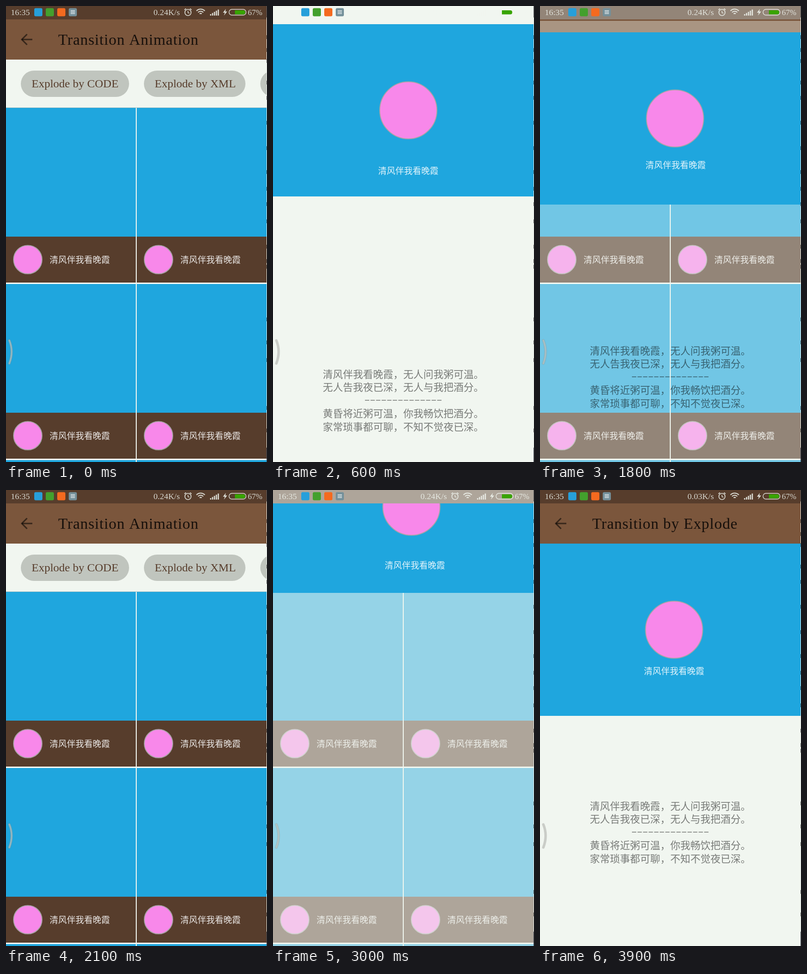
An HTML page with a canvas that plays this animation: 545x953 px, repeating every 4000 ms.

```html
<!DOCTYPE html>
<html lang="zh">
<head>
<meta charset="utf-8">
<title>Transition Animation</title>
<style>
html, body { margin: 0; width: 100%; height: 100%; overflow: hidden; background: #f1f6f0; }
canvas { display: block; }
</style>
</head>
<body>
<canvas id="stage" width="545" height="953"></canvas>
<script>
const ctx = document.getElementById('stage').getContext('2d');
const start = performance.now();
const W = 544, H = 953, LOOP = 4000, STEP = 100, BAR = 28;
const LIGHT = '#f1f6f0', BLUE = '#1fa6de', DARK = '#573d2c', BROWN = '#7b563c', PINK = '#f888ea';
const SERIF = '"Liberation Serif", "Times New Roman", serif';
const CJK = '"Noto Sans CJK SC", "Noto Sans CJK", sans-serif';
const NAME = '清风伴我看晚霞';
const NAME_INK = 'rgba(255,255,255,.88)';
const POEM = [
  NAME + '，无人问我粥可温。',
  '无人告我夜已深，无人与我把酒分。',
  '',
  '黄昏将近粥可温，你我畅饮把酒分。',
  '家常琐事都可聊，不知不觉夜已深。'
];

// Each part flies out by TRAVEL pixels; enter and leave are start times in ms.
const TRAVEL = 950;
const PARTS = {
  header: { enter: 157, leave: 1650, span: 615 },
  name: { enter: 190, leave: 1664, span: 506, leaveSpan: 620 },
  poem: { enter: 190, leave: 1644, span: 620 },
  toolbar: { enter: 240, leave: 1619, span: 620 }
};
const SECOND_ENTER = 2548;

const clamp = v => Math.min(1, Math.max(0, v));

function rect(x, y, w, h, color) {
  ctx.fillStyle = color;
  ctx.fillRect(x, y, w, h);
}

function round(x, y, w, h, r, color) {
  ctx.fillStyle = color;
  ctx.beginPath();
  ctx.roundRect(x, y, w, h, r);
  ctx.fill();
}

function text(str, x, y, size, color, family = SERIF, align = 'left', weight = 400) {
  ctx.font = `${weight} ${size}px ${family}`;
  ctx.textAlign = align;
  ctx.fillStyle = color;
  ctx.fillText(str, x, y);
}

function cjk(str, x, middle, size, color, align) {
  text(str, x, middle + size * 0.37, size, color, CJK, align, 300);
}

function line(points, width, color) {
  ctx.strokeStyle = color;
  ctx.lineWidth = width;
  ctx.beginPath();
  points.forEach(([x, y]) => ctx.lineTo(x, y));
  ctx.stroke();
}

function arc(x, y, r, width, color, from = 0, to = Math.PI * 2) {
  ctx.strokeStyle = color;
  ctx.lineWidth = width;
  ctx.beginPath();
  ctx.arc(x, y, r, from, to);
  ctx.stroke();
}

function avatar(x, y, r) {
  ctx.fillStyle = PINK;
  ctx.beginPath();
  ctx.arc(x, y, r, 0, Math.PI * 2);
  ctx.fill();
  arc(x, y, r - 0.3, 1.8, '#a9a3a6');
}

function toolbar(title) {
  rect(0, BAR, W, 84, BROWN);
  const ink = 'rgba(0,0,0,.54)';
  line([[55, 70], [33, 70]], 3, ink);
  line([[44, 59], [33, 70], [44, 81]], 3, ink);
  ctx.letterSpacing = '0.9px';
  text(title, 109, 81, 32, 'rgba(0,0,0,.82)');
  ctx.letterSpacing = '0px';
}

function pill(label, x, w) {
  round(x, 135, w, 55, 27.5, '#c0c5be');
  text(label, x + 22.5, 170, 24, DARK);
}

function list() {
  rect(0, 0, W, H, LIGHT);
  rect(0, 0, W, BAR, DARK);
  toolbar('Transition Animation');
  pill('Explode by CODE', 31, 226);
  pill('Explode by XML', 288, 212);
  pill('', 531, 212);
  rect(0, 212, W, 1, '#a9c3c6');
  for (let row = 0; row < 3; row++) {
    for (const x of [0, 273]) {
      const y = 213 + row * 368;
      rect(x, y, 271, 269, BLUE);
      rect(x, y + 269, 271, 96, DARK);
      avatar(x + 45.5, y + 317, 30);
      cjk(NAME, x + 91, y + 317, 18, NAME_INK);
    }
  }
}

function detail(shift) {
  const { header, name, poem, toolbar: bar } = shift;
  rect(0, -bar, W, BAR, DARK);
  ctx.save();
  ctx.beginPath();
  ctx.rect(0, BAR, W, H);
  ctx.clip();

  rect(0, 112 - header, W, 360, BLUE);
  avatar(280 + header * 0.035, 292 - header, 60);
  cjk(NAME, 280 + name * 0.073, 378 - name, 18, NAME_INK, 'center');

  const ink = 'rgba(0,0,0,.5)';
  POEM.forEach((str, i) => cjk(str, 272, 660 + i * 27.5 + poem, 21, ink, 'center'));
  ctx.setLineDash([9, 2.6]);
  line([[192, 715 + poem], [352, 715 + poem]], 1.4, ink);
  ctx.setLineDash([]);

  ctx.translate(0, -bar);
  toolbar('Transition by Explode');
  ctx.restore();
}

function statusBar(speed) {
  const ink = 'rgba(241,246,240,.84)';
  text('16:35', 10, 19, 17.5, ink);
  ['#279fda', '#43a02d', '#f46a1f', '#74909a'].forEach((color, i) =>
    round(59 + i * 24, 4.5, 17, 17, 3, color));
  for (const y of [9, 12, 15]) rect(135, y, 9, 1.5, 'rgba(255,255,255,.8)');
  text(speed, 308, 19, 17.5, ink);

  arc(380, 13.5, 6.5, 1.7, ink);
  line([[380, 10], [380, 14], [383, 15]], 1.4, ink);
  line([[372.5, 8], [376, 5.5]], 1.7, ink);
  line([[384, 5.5], [387.5, 8]], 1.7, ink);

  for (const r of [3, 7.5, 12]) arc(406.5, 18.5, r, 2, ink, -Math.PI * 0.76, -Math.PI * 0.24);
  for (let i = 0; i < 5; i++) rect(426 + i * 4, 17 - i * 2.4, 2.6, 3 + i * 2.4, ink);

  ctx.fillStyle = ink;
  ctx.beginPath();
  [[459, 6], [453, 14], [457, 14], [455, 20], [462, 11.5], [458, 11.5]]
    .forEach(([x, y]) => ctx.lineTo(x, y));
  ctx.fill();

  ctx.strokeStyle = ink;
  ctx.lineWidth = 1.4;
  ctx.beginPath();
  ctx.roundRect(465.7, 7, 35.5, 12, 6);
  ctx.stroke();
  round(478, 9, 21.5, 8.5, [0, 4, 4, 0], '#38a400');
  text('67%', 505, 19, 16.5, ink);
}

function edgeHandle() {
  ctx.lineCap = 'round';
  for (const [width, color] of [[5.4, 'rgba(120,125,120,.3)'], [3.8, 'rgba(200,200,195,.6)']]) {
    ctx.strokeStyle = color;
    ctx.lineWidth = width;
    ctx.beginPath();
    ctx.moveTo(7, 699);
    ctx.quadraticCurveTo(16.5, 722, 7, 747);
    ctx.stroke();
  }
  ctx.lineCap = 'butt';
}

function rightEdge() {
  rect(W, 0, 1, H, '#d9ddd9');
  rect(W, 0, 1, 24, '#55565a');
  rect(W, 923, 1, 30, '#3c4350');
  for (const y of [65, 92, 115, 160, 192, 244, 297, 347, 382, 414, 450, 503, 533, 545,
    655, 703, 740, 840, 887]) rect(W, y - 4, 1, 8, '#555');
}

function offset(part, t) {
  if (t >= 1500 && t < 2500) {
    return TRAVEL * clamp((t - part.leave) / (part.leaveSpan || part.span)) ** 2;
  }
  const clock = t < 1500 ? t : t - SECOND_ENTER;
  return TRAVEL * (1 - clamp((clock - part.enter) / part.span)) ** 2;
}

function veil(t) {
  if (t >= 1500 && t < 2500) return 1 - clamp((t - 1617) / 300);
  const clock = t < 1500 ? t : t - SECOND_ENTER;
  return clamp((clock - 283) / 300);
}

function draw(t) {
  list();
  ctx.globalAlpha = veil(t);
  rect(0, 0, W, H, LIGHT);
  ctx.globalAlpha = 1;
  const shift = {};
  for (const key in PARTS) shift[key] = Math.round(offset(PARTS[key], t));
  detail(shift);
  statusBar(t < 3500 ? '0.24K/s' : '0.03K/s');
  edgeHandle();
  rightEdge();
}

function tick() {
  const t = (performance.now() - start) % LOOP;
  draw(Math.floor(t / STEP) * STEP);
  requestAnimationFrame(tick);
}
tick();
</script>
</body>
</html>
```
